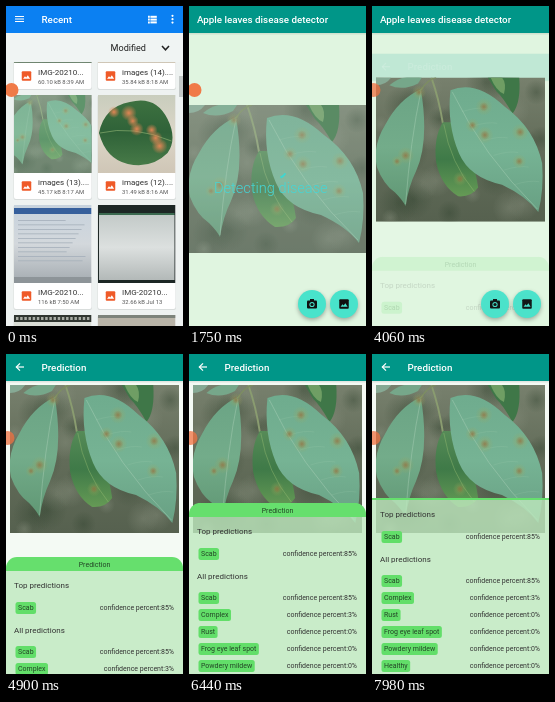
Recreate the animation shown at these times as an HTML page with a canvas. Size 177 by 320 pixels, loop 8000 ms.

```html
<!DOCTYPE html>
<html lang="en">
<head>
<meta charset="utf-8">
<title>Leaf disease detector</title>
<style>
html, body { margin: 0; width: 100%; height: 100%; overflow: hidden; background: #e0f5e0; }
canvas { display: block; width: 177px; height: 320px; }
</style>
</head>
<body>
<canvas id="stage"></canvas>
<script>
const W = 177, H = 320, LOOP = 8000, TEAL = '#009688', MINT = '#48e3cb';
const canvas = document.getElementById('stage');
const c = canvas.getContext('2d');
const dpr = window.devicePixelRatio || 1;
canvas.width = W * dpr;
canvas.height = H * dpr;

const lerp = (a, b, p) => a + (b - a) * p;
const span = (t, start, length) => Math.min(1, Math.max(0, (t - start) / length));

function bezier(x1, y1, x2, y2) {
  const at = (a, b, s) => 3 * a * s * (1 - s) ** 2 + 3 * b * s * s * (1 - s) + s ** 3;
  return x => {
    let lo = 0, hi = 1;
    for (let i = 0; i < 20; i++) {
      const mid = (lo + hi) / 2;
      if (at(x1, x2, mid) < x) lo = mid; else hi = mid;
    }
    return at(y1, y2, lo);
  };
}
const fastOutSlowIn = bezier(.4, 0, .2, 1);
const quickOut = bezier(.15, .5, .05, 1);

function rect(x, y, w, h, fill, r = 0) {
  c.fillStyle = fill;
  c.beginPath();
  c.roundRect(x, y, w, h, r);
  c.fill();
}

function disc(x, y, r, fill) {
  c.fillStyle = fill;
  c.beginPath();
  c.arc(x, y, r, 0, 7);
  c.fill();
}

function line(points, color, width) {
  c.strokeStyle = color;
  c.lineWidth = width;
  c.beginPath();
  points.forEach(([x, y]) => c.lineTo(x, y));
  c.stroke();
}

function text(str, x, y, size, color, weight = 400, align = 'left') {
  c.font = `${weight} ${size}px Roboto, sans-serif`;
  c.fillStyle = color;
  c.textAlign = align;
  c.textBaseline = 'alphabetic';
  c.fillText(str, x, y + size * .35);
}

// Runs draw inside a clipped box whose own units are uw by uh.
function frame(x, y, w, h, uw, uh, draw) {
  c.save();
  c.beginPath();
  c.rect(x, y, w, h);
  c.clip();
  c.translate(x, y);
  c.scale(w / uw, h / uh);
  draw();
  c.restore();
}

function gradient(y0, y1, ...colors) {
  const g = c.createLinearGradient(0, y0, 0, y1);
  colors.forEach((color, i) => g.addColorStop(i / (colors.length - 1), color));
  return g;
}

function glow(x, y, r, rgb, alpha) {
  const g = c.createRadialGradient(x, y, 0, x, y, r);
  g.addColorStop(0, `rgba(${rgb},${alpha})`);
  g.addColorStop(1, `rgba(${rgb},0)`);
  disc(x, y, r, g);
}

function shape(path, fill) {
  c.fillStyle = fill;
  c.fill(new Path2D(path));
}

function vein(path, color = 'rgba(180,215,190,.4)', width = 1) {
  c.strokeStyle = color;
  c.lineWidth = width;
  c.stroke(new Path2D(path));
}

function leafPhoto(x, y, w, h) {
  frame(x, y, w, h, 177, 148, () => {
    rect(0, 0, 177, 148, gradient(0, 148, '#77806d', '#626c59', '#56614f'));
    for (let i = 0; i < 36; i++) {
      glow(i * 67 % 177, i * 43 % 148, 9 + i % 4 * 4, i % 2 ? '48,66,46' : '138,146,128', .4);
    }
    shape('M14 8 Q28 -4 48 0 L44 6 Q28 14 14 8Z', '#76a78a');
    shape('M0 0 H16 Q10 8 0 8Z', '#86a994');
    shape('M117 0 H150 Q152 26 143 37 Q133 20 126 14Z', '#3f7748');
    shape('M120 0 Q126 14 134 17 Q137 6 132 0Z', '#6f9e64');
    vein('M58 0 Q66 22 70 47', '#8a9c70', 2);
    vein('M47 13 Q54 2 63 0', '#7d8d63', 1.5);
    shape('M47 12 Q24 22 10 48 Q-4 70 1 92 Q8 110 20 118 Q28 126 31 132 Q34 112 42 96 Q56 66 47 12Z',
      gradient(12, 132, '#6ba485', '#73ac8a', '#609774'));
    vein('M47 14 Q36 65 31 130');
    shape('M70 46 Q60 62 63 87 Q68 111 86 122 Q100 123 107 113 Q105 98 99 82 Q95 55 83 46Z',
      gradient(46, 122, '#568b57', '#3f7a48', '#659a55'));
    vein('M71 48 Q78 88 103 117', 'rgba(160,195,120,.4)');
    shape('M78 13 Q105 2 135 30 Q166 52 174 88 Q176 115 170 138 Q158 122 132 110 Q98 103 87 78 Q74 48 78 13Z',
      gradient(13, 138, '#6fac8e', '#76b394', '#68a083'));
    vein('M80 15 Q112 80 169 135');
    for (let i = 0; i < 6; i++) {
      const px = 90 + i * 11, py = 35 + i * 15;
      vein(`M${px} ${py} Q${px + 16} ${py - 5} ${px + 26} ${py - 3}`, 'rgba(180,215,190,.2)', .7);
    }
    [[113, 30, 6], [114, 59, 6], [101, 49, 5], [151, 56, 6], [150, 86, 5], [31, 80, 6],
     [22, 86, 4], [88, 104, 5], [45, 15, 5]].forEach(([sx, sy, r]) => {
      glow(sx, sy, r * 1.5, '160,165,90', .5);
      glow(sx, sy, r * .8, '145,95,55', .55);
    });
  });
}

const thumbs = {
  green() {
    leafPhoto(-8, 0, 94, 78);
    rect(0, 0, 78, 78, 'rgba(170,215,190,.3)');
  },
  rusty() {
    rect(0, 0, 78, 78, gradient(0, 78, '#c9cdbd', '#dcd6c8', '#cfc6b6'));
    shape('M1 38 Q6 12 32 7 Q58 0 70 24 Q80 44 70 58 Q54 74 30 69 Q8 64 1 38Z',
      gradient(5, 70, '#3d7140', '#2f6238', '#477a48'));
    vein('M2 38 Q35 30 74 46', 'rgba(150,185,120,.6)');
    for (let i = 0; i < 7; i++) {
      glow(16 + i * 23 % 50, 17 + i * 17 % 42, 6 + i % 3, '232,135,85', .95);
    }
  },
  paper() {
    rect(0, 0, 78, 78, gradient(0, 78, '#c6d2dd', '#d3d8dc', '#a4abb0'));
    rect(0, 3, 78, 6, '#355f9c');
    for (let i = 0; i < 10; i++) rect(4, 15 + i * 4.5, 48 + i * 19 % 22, .8, '#a2adb8');
    rect(0, 72, 78, 6, '#8d9498');
  },
  screen() {
    rect(0, 0, 78, 78, '#1d2725');
    rect(1, 8, 76, 2, '#3b6a50');
    rect(1, 10, 76, 65, gradient(10, 75, '#c3cac8', '#dce0df', '#b3b9b8'));
  },
  sign() {
    rect(0, 0, 78, 78, '#d9ddd5');
    rect(0, 0, 78, 7, '#303630');
    for (let i = 0; i < 18; i++) rect(2 + i * 4.2, 2, 2.5, 3, '#a9ada5');
  },
  wall() {
    rect(0, 0, 78, 78, '#b9b4a8');
    rect(0, 0, 78, 3, '#7d837b');
  }
};

function pictureIcon(x, y, size, fill, hill) {
  rect(x - size / 2, y - size / 2, size, size, fill, 1);
  const k = size / 10;
  c.fillStyle = hill;
  c.beginPath();
  [[-3.6, 3], [-1.6, .2], [-.3, 1.7], [1.4, -.8], [3.8, 3]].forEach(([a, b]) => c.lineTo(x + a * k, y + b * k));
  c.fill();
}

const files = [
  ['IMG-20210...', '60.10 kB 8:39 AM', 'green'],
  ['images (14)....', '35.84 kB 8:18 AM', 'rusty'],
  ['images (13)....', '45.17 kB 8:17 AM', 'green'],
  ['images (12)....', '31.49 kB 8:16 AM', 'rusty'],
  ['IMG-20210...', '116 kB 7:50 AM', 'paper'],
  ['IMG-20210...', '32.66 kB Jul 13', 'screen'],
  ['', '', 'sign'],
  ['', '', 'wall']
];

function picker() {
  rect(0, 0, W, H + 14, '#eef2f1');
  files.forEach(([name, info, kind], i) => {
    const x = 8 + i % 2 * 84, y = -21 + (i >> 1) * 110;
    rect(x - .5, y, 78.5, 105, '#d9dddc', 2);
    rect(x, y, 77.5, 104, '#fff', 2);
    frame(x, y, 77.5, 78, 78, 78, thumbs[kind]);
    pictureIcon(x + 12.5, y + 91, 9.5, '#ef5a28', '#fff');
    text(name, x + 24, y + 87, 8, '#333');
    text(info, x + 24, y + 96.5, 5.9, '#555');
  });
  rect(0, 27, W, 29, '#f0f4f3');
  text('Modified', 104.5, 42, 9.1, '#222');
  line([[156, 40], [159.5, 43.8], [163, 40]], '#222', 1.5);
  rect(173, 70, 4, 21, '#c3c8c7');
  rect(0, 0, W, 27, '#0b80f2');
  for (let i = 0; i < 3; i++) {
    rect(9, 10 + i * 2.5, 9, 1, '#fff');
    rect(142, 9.8 + i * 2.8, 1.8, 2, '#fff');
    rect(144.4, 9.8 + i * 2.8, 6.4, 2, '#fff');
    disc(166.5, 9.8 + i * 3.4, 1.1, '#fff');
  }
  text('Recent', 35.5, 13.5, 9.8, '#fff', 500);
}

function appBar(title, x) {
  rect(0, 27, W, 1.5, 'rgba(0,0,0,.08)');
  rect(0, 0, W, 27, TEAL);
  text(title, x, 13.2, 9.8, '#fff', 500);
}

function fab(x) {
  c.save();
  c.shadowColor = 'rgba(0,0,0,.3)';
  c.shadowBlur = 4 * dpr;
  c.shadowOffsetY = 2 * dpr;
  disc(x, 298, 14, MINT);
  c.restore();
}

function fabs() {
  fab(123);
  rect(118, 294.5, 10, 8, '#111', 1);
  rect(121, 293, 4, 2, '#111');
  disc(123, 298.5, 2.6, MINT);
  disc(123, 298.5, 1.6, '#111');
  fab(155);
  pictureIcon(155, 298, 9.5, '#111', MINT);
}

function spinner(t) {
  const turn = (t - 710 + LOOP) % 1333 / 1333;
  const head = fastOutSlowIn(span(turn, 0, .5)), tail = fastOutSlowIn(span(turn, .5, .5));
  const rotation = (t - 1750) / 2222 + .5;
  const start = (-90 + tail * 270 + turn * 90 + rotation * 360) * Math.PI / 180;
  c.strokeStyle = '#3fd6d0';
  c.lineWidth = 2;
  c.beginPath();
  c.arc(88.5, 163, 9, start, start + Math.max(.02, (head - tail) * 1.5 * Math.PI));
  c.stroke();
}

function detector(t, busy) {
  rect(0, -8, W, H + 16, '#e0f5e0');
  if (busy) {
    leafPhoto(0, 99, W, 148);
    rect(0, 99, W, 148, 'rgba(185,210,200,.22)');
    spinner(t);
    text('Detecting disease', 25, 182, 14.6, '#45d6d6', 300);
  }
  appBar('Apple leaves disease detector', 8);
}

const results = [['Scab', 85], ['Complex', 3], ['Rust', 0], ['Frog eye leaf spot', 0],
  ['Powdery mildew', 0], ['Healthy', 0]];

function resultRow([name, percent], y) {
  c.font = '400 7px Roboto, sans-serif';
  rect(9.5, y - 6, c.measureText(name).width + 5, 12, '#62de69', 2.5);
  text(name, 12, y, 7, '#234526');
  text(`confidence percent:${percent}%`, 168, y, 7, '#333', 400, 'right');
}

// base is the top of the scrolled content; the sheet itself stops at 144.
function sheet(base) {
  const top = Math.max(base, 144);
  c.save();
  c.beginPath();
  c.rect(0, top, W, H);
  c.clip();
  rect(0, base + 14, W, H, 'rgba(190,233,190,.8)');
  rect(0, base, W, 14, '#66df6d', [11, 11, 0, 0]);
  text('Prediction', 88.5, base + 7.5, 7, '#234526', 400, 'center');
  text('Top predictions', 8, base + 28.5, 8, '#333');
  resultRow(results[0], base + 51);
  text('All predictions', 8, base + 73.5, 8, '#333');
  results.forEach((row, i) => resultRow(row, base + 95 + i * 17));
  c.restore();
}

function prediction(base, withPhoto) {
  rect(0, 0, W, H, '#f4faf4');
  if (withPhoto) leafPhoto(4, 31, 169, 148);
  sheet(base);
  appBar('Prediction', 35.5);
  line([[18, 13], [10.5, 13]], '#fff', 1.2);
  line([[14, 9.3], [10.3, 13], [14, 16.7]], '#fff', 1.2);
}

function draw(t) {
  c.setTransform(dpr, 0, 0, dpr, 0, 0);
  c.globalAlpha = 1;
  const close = span(t, 560, 560), push = span(t, 3920, 450);
  if (push < 1 && close > 0) {
    const p = fastOutSlowIn(close);
    c.save();
    c.translate(0, -8 * (1 - p));
    detector(t, push === 0);
    if (push === 0) fabs();
    c.restore();
    if (p < 1) rect(0, 0, W, H, `rgba(0,0,0,${.12 * (1 - p)})`);
  }
  if (close < 1) {
    const cut = H * quickOut(close);
    c.save();
    c.beginPath();
    c.rect(0, cut, W, H - cut);
    c.clip();
    c.translate(0, 13 * fastOutSlowIn(close));
    picker();
    c.restore();
  }
  if (push > 0) {
    const p = fastOutSlowIn(push);
    const drag = 1 - (1 - span(t, 5950, 910)) ** 1.85;
    c.save();
    c.globalAlpha = push ** 1.6;
    c.translate(0, 80 * (1 - p));
    prediction(203 - 71 * drag, push === 1);
    c.restore();
    if (push < 1) {
      leafPhoto(4, lerp(99, 31, p), 169, 148 - 16 * p * (1 - p));
      c.globalAlpha = 1 - push ** 3;
      fabs();
      c.globalAlpha = 1;
    }
  }
  // floating recorder button
  if (push > 0) disc(1.5, 84, 7, 'rgba(240,112,64,.75)');
  else disc(5.5, 84, 7, '#f07a48');
}

function tick() {
  draw(performance.now() % LOOP);
  requestAnimationFrame(tick);
}
tick();
</script>
</body>
</html>
```
